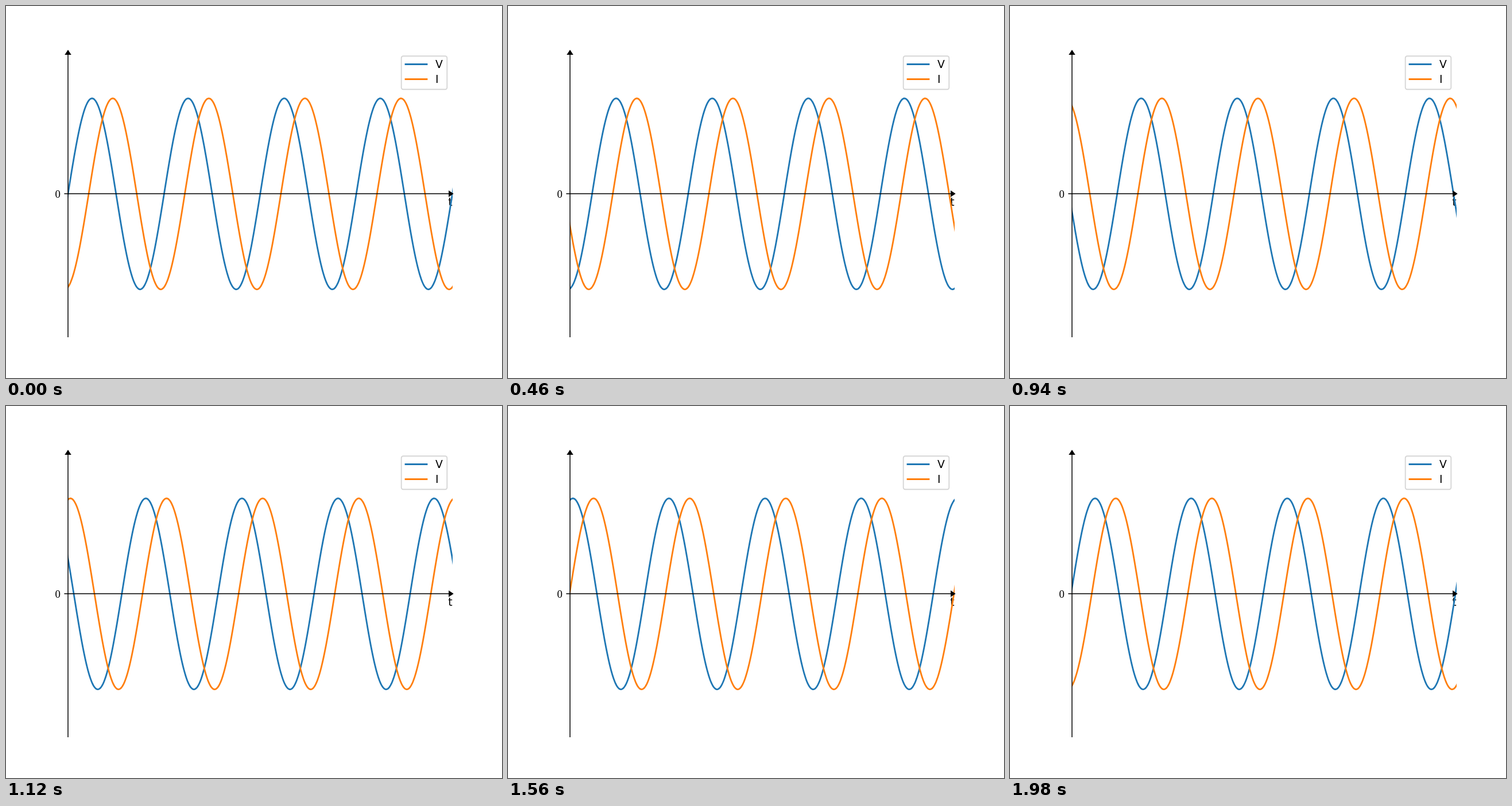
Write an HTML page that moves like this. It is 864 px wide and 648 px high and loops after 2 s.

```html
<!DOCTYPE html>
<html lang="en">
<head>
<meta charset="utf-8">
<title>Voltage and current</title>
<style>
  html, body { margin: 0; width: 100%; height: 100%; overflow: hidden; background: #fff; }
  svg { display: block; }
  text { font: 18.75px "DejaVu Sans", sans-serif; }
  .wave { fill: none; stroke-width: 2.8125; stroke-linecap: square; }
  .v { stroke: #1f77b4; }
  .i { stroke: #ff7f0e; }
  .axis { fill: none; stroke: #000; stroke-width: 1.5; }
  .arrow { stroke: #000; stroke-width: 1.875; }
  .frame { fill: #fff; stroke: #ccc; stroke-opacity: .8; stroke-width: 1.875; }
</style>
</head>
<body>
<svg width="864" height="648" viewBox="0 0 864 648">
  <clipPath id="plot"><rect x="108" y="78" width="670" height="499"/></clipPath>
  <text x="94.9" y="333.5" text-anchor="end" style="font-family: 'Liberation Serif', serif">0</text>
  <text x="777.6" y="348" text-anchor="end">t</text>
  <g clip-path="url(#plot)">
    <path id="voltage" class="wave v"/>
    <path id="current" class="wave i"/>
  </g>
  <path class="arrow" d="M778 327l-6 -4v8z"/>
  <path class="arrow" d="M108 78l-4 6h8z"/>
  <path class="axis" d="M108 77.5V577M101.4 327H778"/>
  <rect class="frame" x="688.7" y="87.3" width="79.6" height="58" rx="3.2"/>
  <path class="wave v" d="M696 101.5h37"/>
  <path class="wave i" d="M696 127.5h37"/>
  <text x="748" y="108">V</text>
  <text x="748" y="134">I</text>
</svg>
<script>
const LOOP = 2000, STEP = 20;
const LEFT = 108, MID = 327.24, AMP = 166.32, PERIOD = 167.4;
const LAG = 1.353 / (2 * Math.PI) * PERIOD;

// One long sine, starting two periods left of the plot, slides under the clip.
const points = [];
for (let x = -2 * PERIOD; x <= 5 * PERIOD; x++) {
  const y = MID - AMP * Math.sin(2 * Math.PI * x / PERIOD);
  points.push((LEFT + x).toFixed(2) + " " + y.toFixed(2));
}
const waves = ["voltage", "current"].map(id => document.getElementById(id));
waves.forEach(wave => wave.setAttribute("d", "M" + points.join("L")));

function draw(now) {
  const time = Math.floor(now % LOOP / STEP) * STEP;
  const shift = time / LOOP * PERIOD;
  waves.forEach((wave, k) => wave.setAttribute("transform", `translate(${shift + k * LAG} 0)`));
  requestAnimationFrame(draw);
}
draw(0);
</script>
</body>
</html>
```
